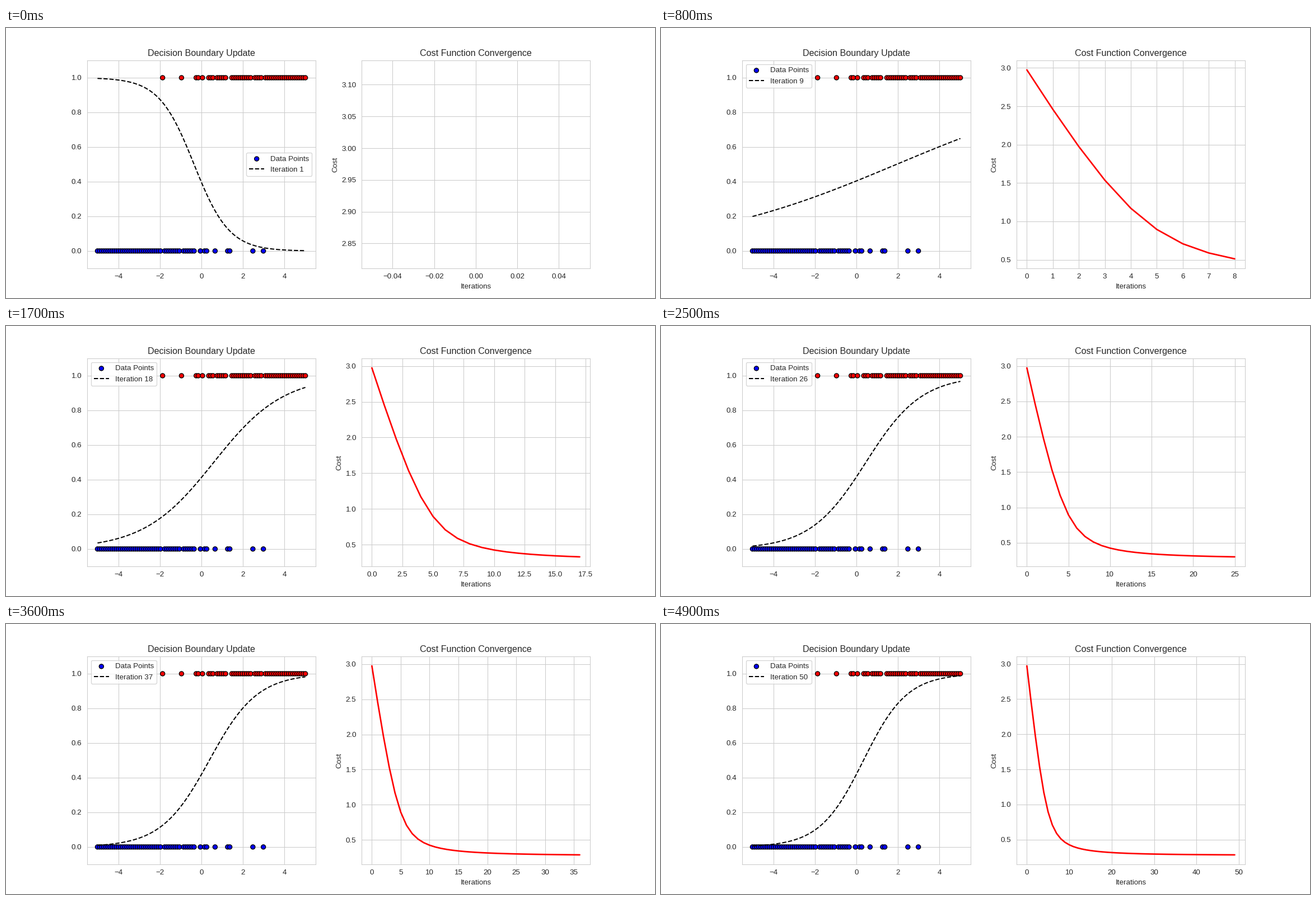
A matplotlib script that plays this animation: 1159x483 px, repeating every 5000 ms.

```python
import numpy as np
import matplotlib.pyplot as plt
from matplotlib.animation import FuncAnimation

WIDTH, HEIGHT, DPI = 1159, 483, 96.6
STEPS, RATE = 50, 0.1

plt.rcParams.update({
    "font.family": "Liberation Sans",
    "text.color": ".15",
    "axes.labelcolor": ".15",
    "axes.edgecolor": ".8",
    "axes.grid": True,
    "axes.axisbelow": True,
    "grid.color": ".8",
    "xtick.color": ".15",
    "ytick.color": ".15",
    "xtick.bottom": False,
    "ytick.left": False,
    "lines.solid_capstyle": "round",
})


def sigmoid(z):
    return 1 / (1 + np.exp(-z))


def train(x, y, weight, bias):
    """Gradient descent on a one-feature logistic model."""
    curves, costs = [], []
    for _ in range(STEPS):
        error = sigmoid(weight * x + bias) - y
        weight -= RATE * np.mean(error * x)
        bias -= RATE * np.mean(error)
        p = sigmoid(weight * x + bias)
        curves.append(p)
        costs.append(-np.mean(y * np.log(p) + (1 - y) * np.log(1 - p)))
    return curves, costs


np.random.seed(42)
x = np.linspace(-5, 5, 100)
y = (x + 1.5 * np.random.randn(100) > 0).astype(int)
weight, bias = np.random.randn(2)
curves, costs = train(x, y, weight, bias)

# The tiny surplus keeps the pixel size from rounding down.
fig, (left, right) = plt.subplots(
    1, 2, figsize=((WIDTH + 0.01) / DPI, (HEIGHT + 0.01) / DPI), dpi=DPI)


def draw(i):
    left.clear()
    left.scatter(x, y, c=y, cmap="bwr", edgecolors="k", label="Data Points")
    left.plot(x, curves[i], "k--", label=f"Iteration {i + 1}")
    left.set_ylim(-0.1, 1.1)
    left.set_title("Decision Boundary Update")
    left.legend()

    right.clear()
    right.plot(range(i + 1), costs[:i + 1], "r-", lw=2)
    right.set_title("Cost Function Convergence")
    right.set_xlabel("Iterations")
    right.set_ylabel("Cost")


anim = FuncAnimation(fig, draw, frames=STEPS, init_func=lambda: draw(0),
                     interval=100, repeat=True)
plt.show()
```
